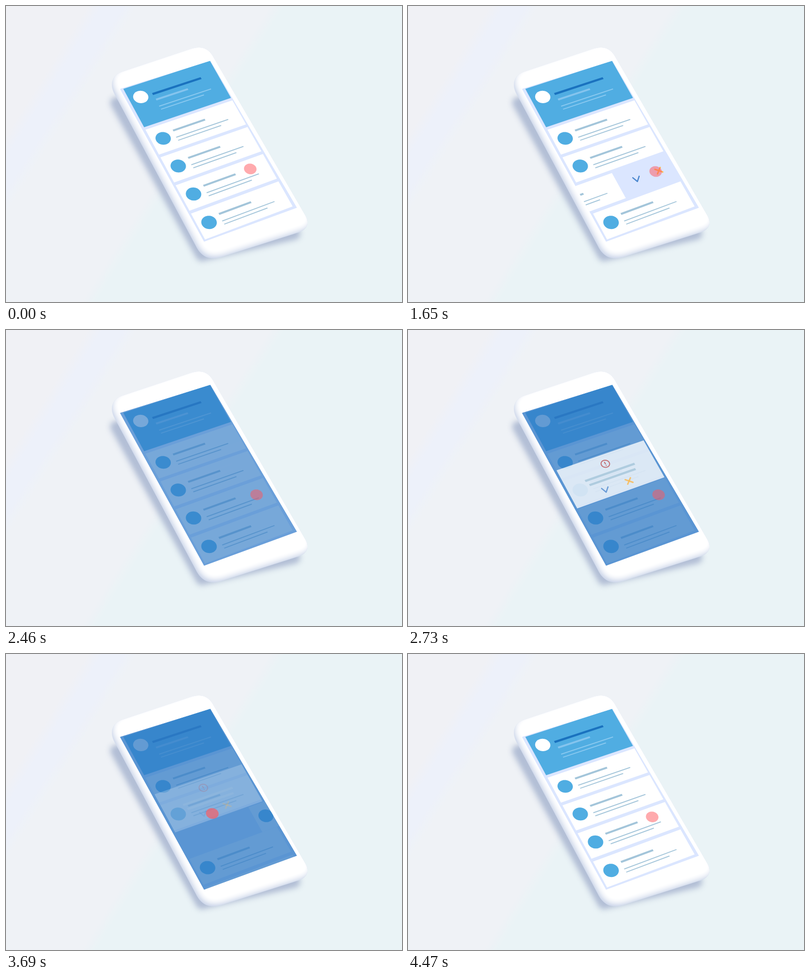
An HTML page with a canvas that plays this animation: 800 by 600 pixels, repeating every 4680 ms.

```html
<!DOCTYPE html>
<html lang="en">
<head>
<meta charset="utf-8">
<title>Swipe to dismiss</title>
<style>
  html, body { margin: 0; width: 100%; height: 100%; overflow: hidden; }
  canvas { display: block; }
</style>
</head>
<body>
<canvas id="stage" width="800" height="600"></canvas>
<script>
const LOOP = 4680, START = 210, BEAT = 540;
const W = 176, H = 348, TOP = 97, PITCH = 64.4, ROW = 58;
const BLUE = '#50ade2', GREY = '#a3c5da';
const ctx = document.getElementById('stage').getContext('2d');

const body = new Path2D('M234 133.5L370 88C391 80 407 84 417 100L605 425C613 440 609 452 594 458L434 509C413 515 397 510 386 491L219 178C209 158 214 141 234 133.5Z');
const screen = new Path2D('M230 168L413 111L588 409L400 478Z');
const shadow = new Path2D('M222 196L395 506L583 462L420 180Z');

// Where the finger rests at the end of each beat, in screen layout units.
const stops = [[140, 246], [32, 250], [110, 250], [149, 254], [149, 254],
  [149, 254], [57, 205], [119, 227], [140, 246]];

const mix = (a, b, p) => a + (b - a) * p;
const clamp = p => Math.min(1, Math.max(0, p));
const inOut = p => p < .5 ? 4 * p ** 3 : 1 - 4 * (1 - p) ** 3;
const ease = (t, start, end) => inOut(clamp((t - start) / (end - start)));
const beat = (t, k) => ease(t, START + k * BEAT, START + (k + 1) * BEAT);

// Flat screen layout to stage, in perspective.
function project([x, y]) {
  const u = x / W, v = y / H, w = 1 + .0258 * u - .0356 * v;
  return [(237 + 185.6 * u + 150.7 * v) / w, (168 - 54.1 * u + 288.2 * v) / w];
}

function trace(points) {
  ctx.beginPath();
  points.forEach(p => ctx.lineTo(...project(p)));
}

function fill(points, color) {
  trace(points);
  ctx.fillStyle = color;
  ctx.fill();
}

function stroke(points, color, width) {
  trace(points);
  ctx.strokeStyle = color;
  ctx.lineWidth = width;
  ctx.stroke();
}

const rect = (x, y, w, h, color) =>
  fill([[x, y], [x + w, y], [x + w, y + h], [x, y + h]], color);
const bar = (x0, x1, y, h, color) => rect(x0, y - h / 2, x1 - x0, h, color);
const ring = (x, y, r) => Array.from({ length: 49 }, (_, i) =>
  [x + r * Math.cos(i * Math.PI / 24), y + r * Math.sin(i * Math.PI / 24)]);

function fillBody(path, color, blur = 0, x = 0, y = 0, line = 0) {
  ctx.save();
  ctx.filter = blur ? `blur(${blur}px)` : 'none';
  ctx.translate(x, y);
  ctx.lineJoin = 'round';
  ctx.lineWidth = line;
  ctx.fillStyle = ctx.strokeStyle = color;
  ctx.fill(path);
  if (line) ctx.stroke(path);
  ctx.restore();
}

function background() {
  const g = ctx.createLinearGradient(0, 0, 422, 268);
  [[.28, '#f0f1f5'], [.33, '#edf1fa'], [.4, '#edf1fa'], [.45, '#eff2f6'],
    [.9, '#eff2f6'], [.95, '#eaf3f6']].forEach(s => g.addColorStop(...s));
  ctx.fillStyle = g;
  ctx.fillRect(0, 0, 800, 600);
}

function phone() {
  fillBody(shadow, '#b2bed5', 6, 0, 0, 23);
  fillBody(body, '#ccd6ea');
  ctx.save();
  ctx.clip(body);
  fillBody(body, '#fff', 4, 4, -7, 3);
  ctx.restore();
}

function textLines(x, y, color, thin = color) {
  bar(x + 45.5, x + 110, y + 20.2, 4, color);
  bar(x + 44.5, x + 150, y + 35.7, 1.9, thin);
  bar(x + 45, x + 132, y + 43, 1.9, thin);
}

function header() {
  rect(0, 0, W, 91, BLUE);
  fill(ring(22, 28, 13.8), '#fff');
  bar(44.6, 143.4, 30, 4.5, '#1a72bf');
  textLines(0, 23.4, '#84c4ee', '#8ccaf0');
}

function card(x, y) {
  rect(x, y, W, ROW, '#fff');
  fill(ring(x + 21.7, y + 29, 13.8), BLUE);
  textLines(x, y, GREY);
}

function choices(x0, x1, y) {
  stroke([[x0 - 5.3, y - 4.5], [x0 - 1.1, y + 6], [x0 + 6.8, y - 3]], '#4b87cf', 2.5);
  for (const d of [-5.3, 5.3])
    stroke([[x1 - 5.3, y - d], [x1 + 5.3, y + d]], '#fdb84c', 3);
}

function popup() {
  const mid = W / 2;
  rect(0, 136, W, 88, '#fff');
  stroke(ring(mid, 156.2, 7.8), '#bd4f52', 2);
  bar(mid - 1, mid + 1, 154.6, 5.6, '#bd4f52');
  bar(mid - 1, mid + 1, 160, 2, '#bd4f52');
  bar(mid - 50, mid + 50, 176.3, 4.6, GREY);
  bar(mid - 46.5, mid + 46.5, 187.4, 4.6, GREY);
  choices(mid - 24, mid + 24, 206.5);
}

function finger(t) {
  const k = Math.min(stops.length - 2, Math.max(0, Math.floor((t - START) / BEAT)));
  const [x, y] = stops[k].map((v, i) => mix(v, stops[k + 1][i], beat(t, k)));
  ctx.globalAlpha = .5 + .16 * Math.sin(Math.PI * clamp((t - 3480) / 510));
  fill(ring(x, y, 11.5), '#ff575c');
}

function draw(t) {
  const swipe = 108 * (beat(t, 0) - beat(t, 3));
  const dismiss = 288 * ease(t, 3480, 3900);
  const rise = ease(t, 3570, 3990);

  background();
  phone();
  ctx.save();
  ctx.clip(screen);
  ctx.lineCap = ctx.lineJoin = 'round';
  fillBody(screen, '#dbe6ff');
  header();
  if (t < 2400) {
    ctx.globalAlpha = ease(t, 600, 930);
    choices(104, 149.5, 254);
    ctx.globalAlpha = 1;
  }
  for (let i = 0; i < 5; i++)
    card(i === 2 ? dismiss - swipe : 0, TOP + PITCH * (i > 2 ? i - rise : i));

  ctx.globalAlpha = .75 * (ease(t, 2230, 2570) - ease(t, 3660, 3990));
  fillBody(screen, '#2f7ac5');
  ctx.globalAlpha = ease(t, 2400, 2940) - ease(t, 3480, 3820);
  popup();
  finger(t);
  ctx.restore();
}

const begin = performance.now();
function tick() {
  draw((performance.now() - begin) % LOOP);
  requestAnimationFrame(tick);
}
tick();
</script>
</body>
</html>
```
